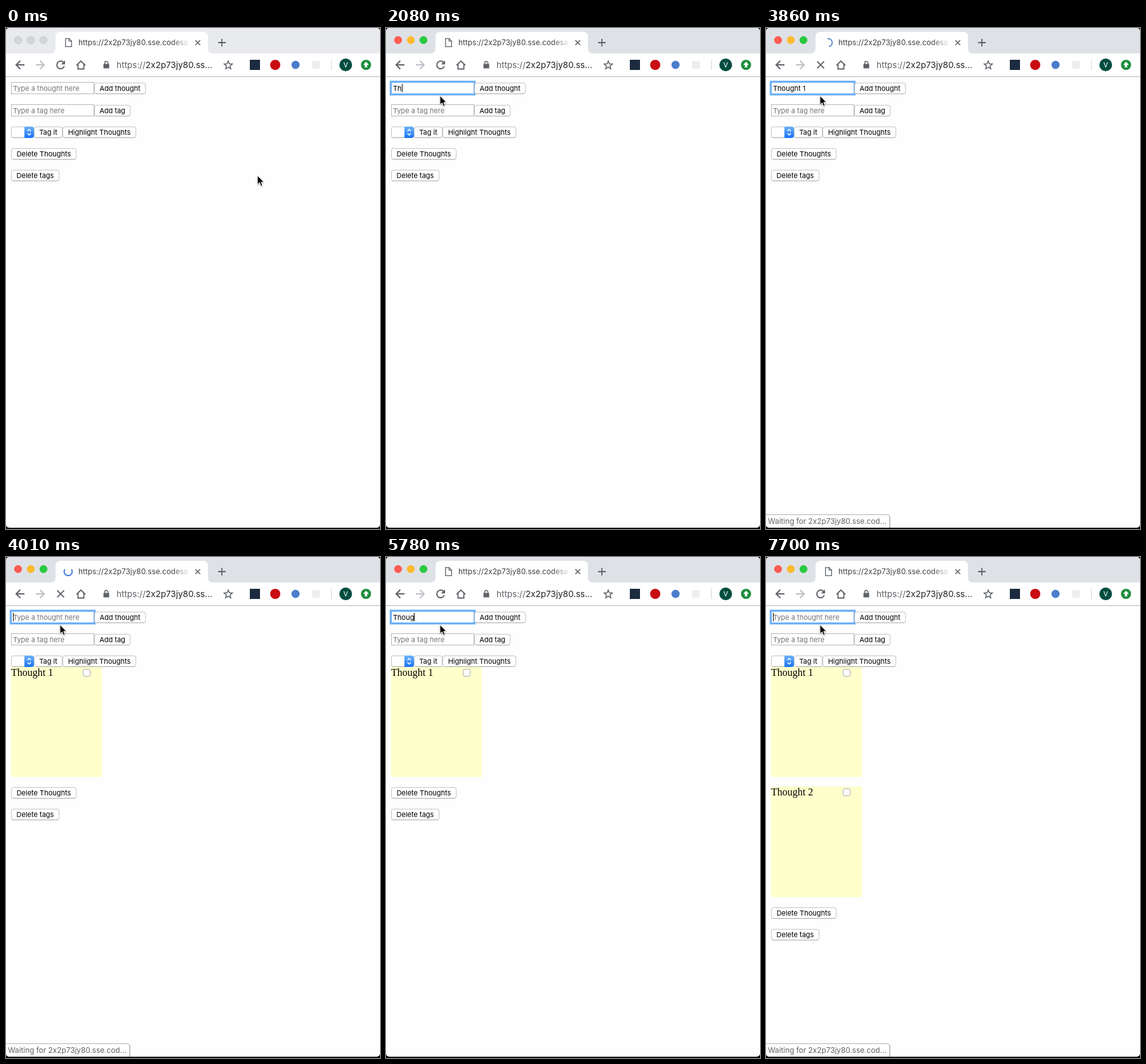
Write an HTML page that moves like this. It is 589x788 px and loops after 8000 ms.

```html
<!DOCTYPE html>
<html lang="en">
<head>
<meta charset="utf-8">
<title>Thoughts</title>
<style>
  html, body { margin: 0; width: 100%; height: 100%; overflow: hidden; background: #000; }
  body { position: relative; font: 11px/18px Inter, sans-serif; color: #000; }
  svg, #window div { position: absolute; box-sizing: border-box; white-space: pre; }
  svg { left: 0; top: 0; }
  #window { position: absolute; left: 0; top: 0; width: 589px; height: 786px; overflow: hidden;
    border-radius: 5px; background: #fefefe; }
  #window .button { height: 18px; border: 1px solid #c6c6c6; border-bottom-color: #a9a9a9;
    border-radius: 4px; background: #fff; line-height: 17px; text-align: center; }
  #window .input { left: 8px; width: 131px; height: 19px; border: 1px solid #b9b9b9;
    background: #fff; padding-left: 2px; line-height: 18px; }
  .hint { color: #757575; }
  #window .focus { border-color: #5ea5f3; box-shadow: 0 0 1px 2px #75b5f8; }
  #caret { display: inline-block; position: absolute; top: 2px; width: 1px; height: 13px; background: #000; }
  #window .note { left: 8px; width: 143px; background: #ffc; font: 16px/18px "Liberation Serif", serif; }
  .note i { position: absolute; left: 113px; top: 3px; width: 10px; height: 10px;
    border: 1px solid #adadad; border-radius: 3px; background: #fff; }
  #window #status { left: -1px; top: 765px; width: 196px; height: 22px; padding-left: 3px;
    border: 1px solid #b4b4b4; border-radius: 0 4px 0 0; background: #fff; color: #5f6368;
    font-size: 11.8px; line-height: 20px; box-shadow: 1px 1px 2px #0003; }
</style>
</head>
<body>
<div id="window">
  <svg width="589" height="77" fill="none" stroke="#5f6368" stroke-width="2">
    <defs>
      <linearGradient id="fade" gradientUnits="userSpaceOnUse" x1="262" x2="290" y1="0" y2="0">
        <stop stop-color="#3c4043"/><stop offset="1" stop-color="#3c4043" stop-opacity="0"/>
      </linearGradient>
    </defs>
    <g stroke="none">
      <path id="strip" d="M0 0H589V40H0z"/>
      <path fill="#fff" d="M0 40H70Q78 40 78 32V14Q78 6 86 6H310Q318 6 318 14V32Q318 40 326 40H589V76H0z"/>
      <path fill="#b8b8b8" d="M0 76H589V77H0z"/>
    </g>
    <g id="lights" stroke-width="1">
      <circle cx="19" cy="19" r="5.7"/><circle cx="39" cy="19" r="5.7"/><circle cx="59" cy="19" r="5.7"/>
    </g>
    <path id="page" stroke-width="1.3" d="M93.7 16.6H99.5L103.3 20.4V29.4H93.7zM99.3 16.6V20.6H103.3"/>
    <circle id="spinner" cx="98" cy="23" r="6.3" pathLength="360"/>
    <g stroke="none" font-family="Inter, sans-serif">
      <text x="114" y="27" font-size="11.8" fill="url(#fade)">https://2x2p73jy80.sse.codesa</text>
      <text x="174" y="63" font-size="13.5" fill="#202124"><tspan fill="#5f6368">https://</tspan>2x2p73jy80.ss...</text>
    </g>
    <path stroke-width="1.6" d="M298.2 19.2l7.6 7.6m0-7.6l-7.6 7.6"/>
    <path stroke-width="1.8" d="M334 23H346M340 17V29"/>
    <path id="arrow" d="M29 58H16.5M22.5 51.5L16 58l6.5 6.5"/>
    <path stroke="#bdc1c6" d="M47 58H59.5M53.5 51.5L60 58l-6.5 6.5"/>
    <g id="reload">
      <path d="M90.6 54.2A6 6 0 1 0 91.7 60"/>
      <path fill="#5f6368" stroke="none" d="M93 51V57.3H86.7z"/>
    </g>
    <path id="stop" d="M80.6 52.6l10.8 10.8m0-10.8l-10.8 10.8"/>
    <path stroke-width="1.8" d="M111 58.6L118 52l7 6.6M113.4 57V64.5H122.6V57"/>
    <path stroke="none" fill="#5f6368" d="M153.5 56.5H162.5V63.5H153.5z"/>
    <path stroke-width="1.4" d="M155.5 57V55a2.5 2.5 0 0 1 5 0V57"/>
    <path stroke-width="1.5" d="M350 52l1.8 4.2 4.6.4-3.5 3 1.1 4.5-4-2.4-4 2.4 1.1-4.5-3.5-3 4.6-.4z"/>
    <g stroke="none">
      <path fill="#1d2b40" d="M384 50H400V66H384z"/>
      <circle cx="424" cy="58" r="8" fill="#c70d12"/>
      <circle cx="456" cy="58" r="6.5" fill="#4b7dcc"/>
      <path fill="#eee" d="M482 52H494V64H482z"/>
      <path fill="#d3d6da" d="M512 50H513V66H512z"/>
      <circle cx="535" cy="58" r="10" fill="#004d40"/>
      <text x="535" y="62" font-size="11" font-family="Roboto, sans-serif" fill="#fff" text-anchor="middle">V</text>
      <circle cx="567" cy="58" r="8" fill="#1e8e3e"/>
      <path fill="#fff" d="M567 53l4.5 5H568.8V62H565.2V58H562.5z"/>
    </g>
  </svg>

  <div class="input" id="thought" style="top:85px"><span id="typed"></span><i id="caret"></i><span class="hint" id="hint">Type a thought here</span></div>
  <div class="button" style="left:139px;top:86px;width:81px">Add thought</div>
  <div class="input hint" style="top:120px">Type a tag here</div>
  <div class="button" style="left:139px;top:121px;width:57px">Add tag</div>
  <div class="button" style="left:8px;top:155px;width:36px"></div>
  <svg width="50" height="180" fill="none">
    <defs><linearGradient id="blue" x2="0" y2="1"><stop stop-color="#6db3fa"/><stop offset="1" stop-color="#1873f6"/></linearGradient></defs>
    <path fill="url(#blue)" d="M29 155H40Q44 155 44 159V169Q44 173 40 173H29z"/>
    <path stroke="#fff" stroke-width="1.4" d="M33.8 162.2l2.7-2.7 2.7 2.7M33.8 165.8l2.7 2.7 2.7-2.7"/>
  </svg>
  <div class="button" style="left:44px;top:155px;width:45px">Tag it</div>
  <div class="button" style="left:89px;top:155px;width:116px">Highlight Thoughts</div>
  <div class="note" id="note1" style="top:173px;height:173px">Thought 1<i></i></div>
  <div class="note" id="note2" style="top:361px;height:174px">Thought 2<i></i></div>
  <div id="deletes" style="left:8px;top:189px">
    <div class="button" style="left:0;top:0;width:103px">Delete Thoughts</div>
    <div class="button" style="left:0;top:34px;width:76px">Delete tags</div>
  </div>
  <div id="status">Waiting for 2x2p73jy80.sse.cod...</div>
</div>
<svg width="589" height="788">
  <path id="pointer" d="M0 0V14.2L3.3 11.2 5.6 16.5 8 15.5 5.8 10.4H10.2z" stroke="#fff"
    style="filter:drop-shadow(0 1px 1px #0005)"/>
  <path id="beam" d="M-3 -7.5Q0 -7.5 0 -5V5Q0 7.5 -3 7.5M3 -7.5Q0 -7.5 0 -5V5Q0 7.5 3 7.5" fill="none" stroke="#222"/>
</svg>

<script>
const LOOP = 8000, TICK = 148.3, FOCUS = 1050;
const $ = id => document.getElementById(id);
const show = (id, on) => { $(id).style.display = on ? '' : 'none'; };
const within = (t, spans) => spans.some(([from, to]) => t >= from && t < to);

const typing = [
  [0, ''], [1790, 'T'], [2080, 'Th'], [2230, 'Tho'], [2380, 'Thou'], [2530, 'Thoug'],
  [2670, 'Thought'], [2820, 'Thought '], [3120, 'Thought 1'], [4010, ''],
  [5190, 'T'], [5340, 'Th'], [5630, 'Thou'], [5780, 'Thoug'],
  [5930, 'Thought'], [6070, 'Thought '], [6370, 'Thought 2'], [7410, '']
];
const caretOff = [[0, FOCUS], [1490, 1790], [3570, 4010], [4590, 5040], [6810, 7410]];
const statusOn = [[3720, 4740], [6960, LOOP]];
const loads = [{ start: 3570, reply: 4010, end: 4450 }, { start: 6810, reply: 7410, end: 7700 }];

function drawPointer(t) {
  const p = Math.min(7, Math.floor(t / 150)) / 7;
  const ease = p * p * (3 - 2 * p);
  let x = 396 - 310 * ease, y = 232 - 136 * ease;
  if (t >= 1350) [x, y] = [85, 106.5];
  else if (t >= 1200) [x, y] = [86, 105];
  const inField = x < 139 && y < 104;
  show('pointer', !inField);
  show('beam', inField);
  $(inField ? 'beam' : 'pointer').setAttribute('transform', `translate(${x} ${y})`);
}

function drawLoading(t) {
  const load = loads.find(l => t >= l.start && t < l.end);
  show('spinner', load);
  show('stop', load);
  show('page', !load);
  show('reload', !load);
  if (!load) return;
  const waiting = t < load.reply;
  const since = Math.floor((t - (waiting ? load.start : load.reply)) / TICK + .05) * TICK;
  const angle = waiting ? -19 - since * 360 / 1320 : -35 + since * 360 / 1568;
  const sweep = waiting ? 180 : 250;
  const spinner = $('spinner');
  spinner.setAttribute('stroke', waiting ? '#6993d2' : '#4680de');
  spinner.setAttribute('stroke-dasharray', `${sweep} ${360 - sweep}`);
  spinner.setAttribute('transform', `rotate(${angle} 98 23)`);
}

function drawWindow(active) {
  $('strip').setAttribute('fill', active ? '#dee1e6' : '#e8eaed');
  const colors = active ? ['#ff5b52', '#fdbb2d', '#29c940'] : Array(3).fill('#d5d6d8');
  [...$('lights').children].forEach((light, i) => {
    light.setAttribute('fill', colors[i]);
    light.setAttribute('stroke', active ? colors[i] : '#c5c6c8');
  });
  document.body.style.background = active ? '#000' : '#15151a';
  $('thought').classList.toggle('focus', active);
}

function draw(t) {
  const text = typing.filter(([at]) => at <= t).pop()[1];
  const notes = loads.filter(l => t >= l.reply).length;
  drawWindow(t >= FOCUS);
  drawPointer(t);
  drawLoading(t);
  $('typed').textContent = text;
  show('hint', !text);
  show('caret', !within(t, caretOff));
  show('note1', notes > 0);
  show('note2', notes > 1);
  $('deletes').style.top = [189, 362, 551][notes] + 'px';
  show('status', within(t, statusOn));
}

function loop() {
  draw(performance.now() % LOOP);
  requestAnimationFrame(loop);
}
loop();
</script>
</body>
</html>
```
